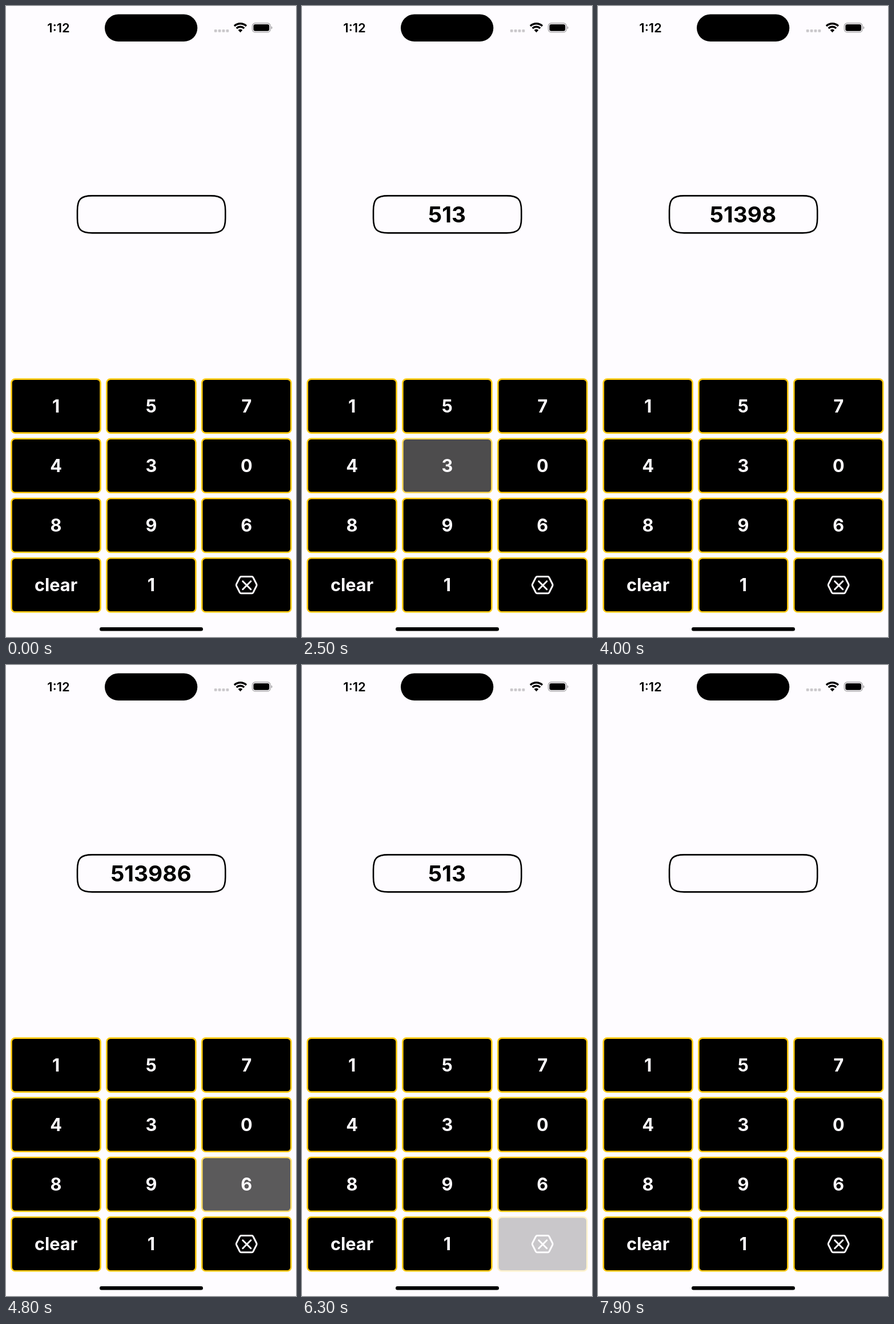
Write an HTML page that moves like this. It is 508x1102 px and loops after 8000 ms.

```html
<!DOCTYPE html>
<html lang="en">
<head>
<meta charset="utf-8">
<title>Keypad</title>
<style>
html, body { margin: 0; width: 100%; height: 100%; overflow: hidden; background: #fefcff; }
svg { display: block; width: 100vw; height: 100vh; font-family: Inter, "Liberation Sans", sans-serif; }
text { text-anchor: middle; font-weight: 700; }
.key rect { stroke: #fdc90c; stroke-width: 2.6; }
.key text { fill: #fefcff; font-size: 30.7px; }
.key path { fill: none; stroke: #fefcff; stroke-width: 3; stroke-linejoin: round; stroke-linecap: round; }
</style>
</head>
<body>
<svg viewBox="0 0 508 1102">
  <text x="92" y="46" font-size="22" style="font-weight:600">1:12</text>
  <rect x="173" y="14.5" width="162.3" height="47.6" rx="23.8"/>
  <g fill="#cac8cb">
    <rect x="364.8" y="41" width="4.8" height="4.8" rx="1.3"/>
    <rect x="371.7" y="41" width="4.8" height="4.8" rx="1.3"/>
    <rect x="378.6" y="41" width="4.8" height="4.8" rx="1.3"/>
    <rect x="385.5" y="41" width="4.8" height="4.8" rx="1.3"/>
  </g>
  <g id="wifi" transform="translate(410.5 46.2)" fill="none" stroke="#000" stroke-width="3.4"></g>
  <rect x="431.4" y="30" width="31.8" height="15.8" rx="5" fill="none" stroke="#a3a1a4" stroke-width="1.3"/>
  <rect x="433.4" y="32" width="27.8" height="11.8" rx="3.2"/>
  <path d="M464.6 35.3q1.9.8 1.9 2.6t-1.9 2.6z" fill="#a3a1a4"/>

  <path id="field" fill="none" stroke="#000" stroke-width="2.6"/>
  <text id="value" x="254" y="378.2" font-size="38.8"></text>
  <g id="keys"></g>
  <rect x="164" y="1085" width="181" height="6.5" rx="3.25"/>
</svg>
<script>
const $ = id => document.getElementById(id);
const LOOP = 8000, DIM = 0.2, PRESS = 150, FADE = 250;

// Wi-Fi: two bands and a wedge, opening 43 degrees to each side
const sector = r => {
  const x = r * Math.sin(0.75), y = -r * Math.cos(0.75);
  return `M${-x} ${y}A${r} ${r} 0 0 1 ${x} ${y}`;
};
$('wifi').innerHTML = `<path d="${sector(15.4)}"/><path d="${sector(9.9)}"/>
  <path d="${sector(5.7)}L0 0z" fill="#000" stroke="none"/>`;

// Input field with smooth corners
$('field').setAttribute('d', `M151 331.4H358.3c20 0 26 6 26 26v13c0 20 -6 26 -26 26
  H151c-20 0 -26 -6 -26 -26v-13c0 -20 6 -26 26 -26z`);

const labels = ['1', '5', '7', '4', '3', '0', '8', '9', '6', 'clear', '1', 'del'];
const icon = `<path d="M-9.2 -14.6H9.2Q10.8 -14.6 11.7 -13L17.3 -2Q18.2 0 17.3 2L11.7 13Q10.8 14.6 9.2 14.6
  H-9.2Q-10.8 14.6 -11.8 13L-17.4 2Q-18.4 0 -17.4 -2L-11.8 -13Q-10.8 -14.6 -9.2 -14.6z
  M-6.5 -6.5L7.5 7.5M7.5 -6.5L-6.5 7.5"/>`;
$('keys').innerHTML = labels.map((label, i) => {
  const x = 87.5 + i % 3 * 166.9, y = 698.6 + Math.floor(i / 3) * 104.2;
  return `<g class="key" transform="translate(${x} ${y})">
    <rect x="-78" y="-47" width="156" height="94" rx="6.5"/>
    ${label === 'del' ? icon : `<text y="11.2">${label}</text>`}</g>`;
}).join('');
const keys = [...$('keys').children];

// [key index, release time]
const taps = [[1, 580], [0, 1130], [4, 2360], [7, 3224], [6, 3690], [8, 4670],
  [11, 5890], [11, 6090], [11, 6290], [9, 7668]];

const ease = p => p < 0.5 ? 2 * p * p : 1 - 2 * (1 - p) ** 2;
const glide = (from, to, p) => from + (to - from) * ease(Math.min(p, 1));

function opacity(key, t) {
  let last = null;
  const rest = time => last === null ? 1 : glide(DIM, 1, (time - last) / FADE);
  for (const [k, up] of taps) {
    const down = up - PRESS;
    if (k !== key || t < down) continue;
    if (t < up) return glide(rest(down), DIM, (t - down) / PRESS);
    last = up;
  }
  return rest(t);
}

function typed(t) {
  let s = '';
  for (const [k, up] of taps) {
    if (t < up) break;
    const label = labels[k];
    s = label === 'clear' ? '' : label === 'del' ? s.slice(0, -1) : s + label;
  }
  return s;
}

const start = performance.now();
function draw() {
  const t = (performance.now() - start) % LOOP;
  $('value').textContent = typed(t);
  keys.forEach((key, i) => key.setAttribute('opacity', opacity(i, t)));
  requestAnimationFrame(draw);
}
draw();
</script>
</body>
</html>
```
